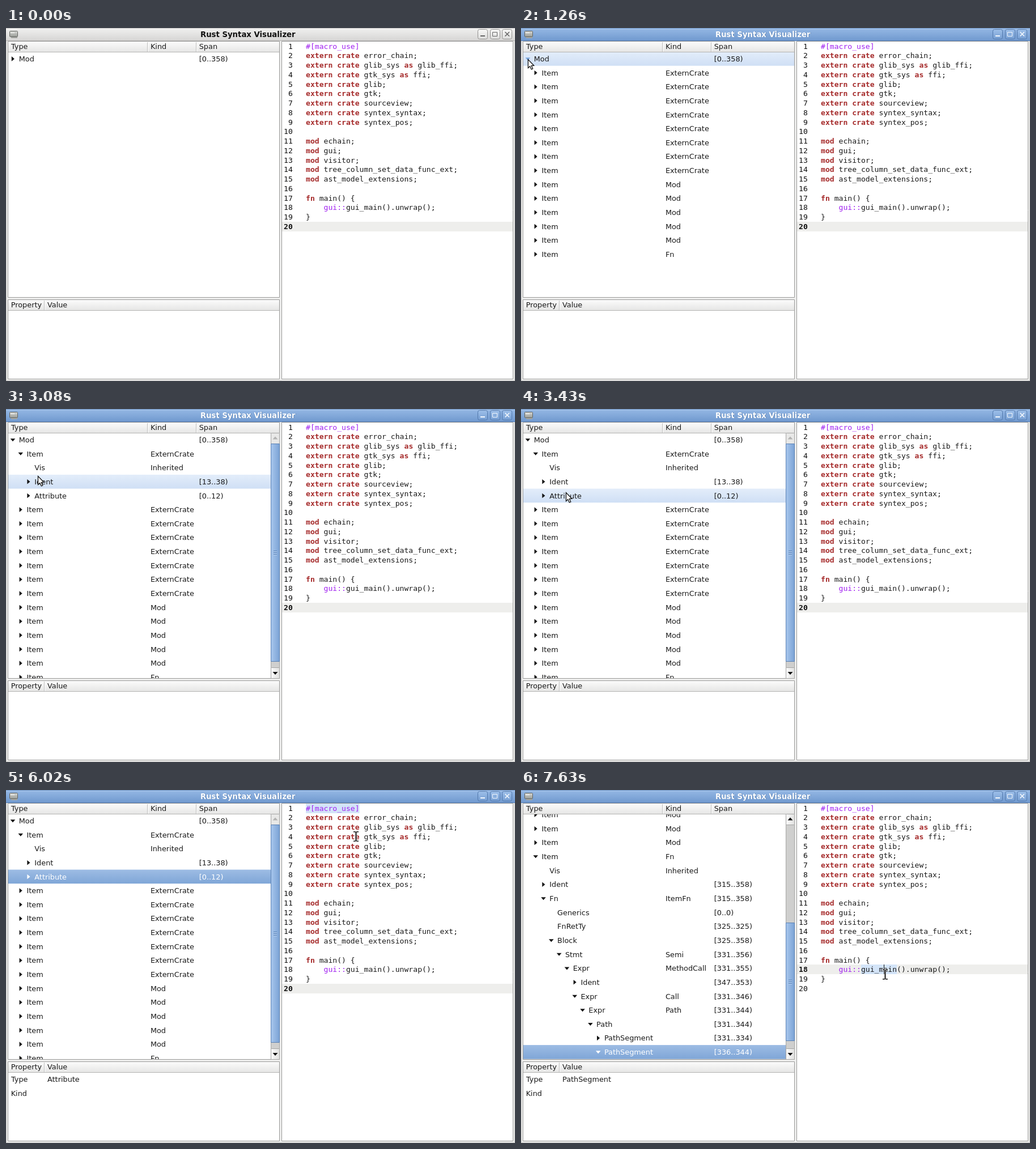
Recreate the animation shown at these times as an HTML page with a canvas. Size 898 by 623 pixels, loop 8 s.

```html
<!DOCTYPE html>
<html lang="en">
<head>
<meta charset="utf-8">
<title>Rust Syntax Visualizer</title>
<style>
  html, body { margin: 0; width: 100%; height: 100%; overflow: hidden; background: #eeeeed; }
  canvas { display: block; }
</style>
</head>
<body>
<canvas id="stage" width="898" height="623"></canvas>
<script>
const ctx = document.getElementById('stage').getContext('2d');
const LOOP = 8000, TICK = 70;
const ROW = 24.64, INDENT = 13.8, TREE_TOP = 42, TREE_BOTTOM = 475;
const KIND_X = 254.9, SPAN_X = 340.7;
const LINE = 16.757, CHAR = 7.886, CODE_X = 529;
const UI = '12.85px "DejaVu Sans", sans-serif';
const TITLE = 'bold 13.25px "DejaVu Sans", sans-serif';
const MONO = '13.1px "DejaVu Sans Mono", monospace';
const INK = '#1a1a1a', KEYWORD = '#a52a2a', MACRO = '#a020f0';

const CODE = `#[macro_use]
extern crate error_chain;
extern crate glib_sys as glib_ffi;
extern crate gtk_sys as ffi;
extern crate glib;
extern crate gtk;
extern crate sourceview;
extern crate syntex_syntax;
extern crate syntex_pos;

mod echain;
mod gui;
mod visitor;
mod tree_column_set_data_func_ext;
mod ast_model_extensions;

fn main() {
    gui::gui_main().unwrap();
}
`.split('\n');

// Row notation: depth, expander (+ closed, - open, . none), type|kind|span
const parseRows = list => list.map(s => {
  const [type, kind = '', span = ''] = s.slice(2).split('|');
  return { depth: +s[0], expander: s[1], type, kind, span };
});
const crates = n => Array(n).fill('1+Item|ExternCrate');
const mods = n => Array(n).fill('1+Item|Mod');
const closedRoot = parseRows(['0+Mod||[0..358)']);
const openRoot = parseRows(['0-Mod||[0..358)', ...crates(8), ...mods(5), '1+Item|Fn']);
const openItem = parseRows(['0-Mod||[0..358)', '1-Item|ExternCrate', '2.Vis|Inherited',
  '2+Ident||[13..38)', '2+Attribute||[0..12)', ...crates(7), ...mods(5), '1+Item|Fn']);
const openFn = parseRows([...mods(3), '1-Item|Fn', '2.Vis|Inherited', '2+Ident||[315..358)',
  '2-Fn|ItemFn|[315..358)', '3.Generics||[0..0)', '3.FnRetTy||[325..325)', '3-Block||[325..358)',
  '4-Stmt|Semi|[331..356)', '5-Expr|MethodCall|[331..355)', '6+Ident||[347..353)',
  '6-Expr|Call|[331..346)', '7-Expr|Path|[331..344)', '8-Path||[331..344)',
  '9+PathSegment||[331..334)', '9-PathSegment||[336..344)']);

// mark: line, first column, length of the highlighted source span
const STATES = [
  { at: 0, rows: closedRoot, line: 20 },
  { at: 1260, rows: openRoot, line: 20, active: true },
  { at: 2450, rows: openItem, line: 20, active: true, thumb: [61, 446] },
  { at: 4060, rows: openItem, line: 20, active: true, thumb: [61, 446], selected: 4, mark: [1, 0, 12] },
  { at: 7630, rows: openFn, top: 31.2, line: 18, active: true, thumb: [234, 443], selected: 17,
    mark: [18, 9, 8], caret: 641 }
];

// Pointer stops: time, x, y, eased arrival
const PATH = [
  [350, -14, 64], [980, 12, 55, true], [1750, 12, 55], [2170, 25, 81, true], [2660, 25, 81],
  [3430, 79, 147, true], [4900, 79, 147], [4970, 80, 148], [5740, 568.5, 38.5, true],
  [6020, 617, 82], [6580, 642, 290], [6790, 642, 324.5], [6930, 642, 324.5], [7070, 642, 325.5]
];

function pointerAt(t) {
  const next = PATH.findIndex(p => p[0] > t);
  if (next === 0) return { x: -50, y: 64 };
  if (next < 0) return { x: PATH.at(-1)[1], y: PATH.at(-1)[2] };
  const [t0, x0, y0] = PATH[next - 1], [t1, x1, y1, eased] = PATH[next];
  let k = (t - t0) / (t1 - t0);
  if (eased) k = k * k * (3 - 2 * k);
  return { x: Math.round(x0 + (x1 - x0) * k), y: Math.round(y0 + (y1 - y0) * k) };
}

function rect(x, y, w, h, fill) {
  ctx.fillStyle = fill;
  ctx.fillRect(x, y, w, h);
}

function shade(x, y, w, h, from, to, sideways) {
  const g = sideways ? ctx.createLinearGradient(x, 0, x + w, 0) : ctx.createLinearGradient(0, y, 0, y + h);
  g.addColorStop(0, from);
  g.addColorStop(1, to);
  rect(x, y, w, h, g);
}

function outline(x, y, w, h, color, radius = 0) {
  ctx.strokeStyle = color;
  ctx.lineWidth = 1;
  ctx.beginPath();
  ctx.roundRect(x + .5, y + .5, w - 1, h - 1, radius);
  ctx.stroke();
}

function text(str, x, y, font = UI, color = INK) {
  ctx.font = font;
  ctx.fillStyle = color;
  ctx.fillText(str, x, y);
}

function polygon(points, fill, stroke) {
  ctx.beginPath();
  points.forEach(([x, y]) => ctx.lineTo(x, y));
  ctx.closePath();
  ctx.fillStyle = fill;
  ctx.fill();
  if (stroke) {
    ctx.strokeStyle = stroke;
    ctx.lineWidth = 1.3;
    ctx.stroke();
  }
}

function panel(x, y, w, h) {
  rect(x, y, w, h, '#fff');
  outline(x, y, w, h, '#9b9b9a');
}

function header(y, separators, labels) {
  shade(4, y, 478, 18, '#fbfbfb', '#e6e6e5');
  rect(4, y + 18, 478, 1, '#b4b4b3');
  for (const x of separators) {
    rect(x, y + 1, 1, 17, '#bcbcbb');
    rect(x + 1, y + 1, 1, 17, '#fff');
  }
  for (const [label, x] of labels) text(label, x, y + 13.4);
}

function titleBar(active) {
  if (active) shade(0, 0, 898, 23, '#96b9e5', '#6f98ce');
  else shade(0, 0, 898, 23, '#f1f1f0', '#d5d4d3');
  rect(0, 0, 898, 1, active ? '#5f88bd' : '#bdbcbb');
  rect(0, 1, 898, 1, active ? '#b2cdef' : '#fafafa');
  rect(0, 22, 898, 1, active ? '#557eb5' : '#b3b2b1');

  shade(7, 6, 13, 9, '#d5d6d3', '#9b9e99');
  outline(6, 5, 15, 11, '#62645f', 1);
  rect(9, 16, 11, 2, '#aaaba7');
  rect(8, 8, 7, 1, '#f4f4f2');

  ctx.textAlign = 'center';
  if (active) text('Rust Syntax Visualizer', 427.5, 16.2, TITLE, '#4b70a3');
  text('Rust Syntax Visualizer', 426.8, 15.5, TITLE, active ? '#fff' : '#111');
  ctx.textAlign = 'left';

  const glyph = active ? '#f4f8fd' : '#666';
  for (const x of [832, 854, 875]) {
    shade(x + 1, 3, 16, 16, active ? '#9dbfe9' : '#f8f8f7', active ? '#779fd3' : '#dddddc');
    outline(x, 2, 18, 18, active ? '#5077ab' : '#92918f', 3);
  }
  rect(837, 13, 8, 2, glyph);
  outline(858, 7, 9, 8, glyph);
  ctx.strokeStyle = glyph;
  ctx.lineWidth = 1.6;
  ctx.beginPath();
  ctx.moveTo(880.5, 7); ctx.lineTo(888, 14.5);
  ctx.moveTo(888, 7); ctx.lineTo(880.5, 14.5);
  ctx.stroke();
}

function expander(open, x, y, color) {
  polygon(open
    ? [[x - 4.3, y - 2.2], [x + 4.3, y - 2.2], [x, y + 2.8]]
    : [[x - 2.2, y - 4.3], [x + 2.9, y], [x - 2.2, y + 4.3]], color);
}

function tree(state, pointer) {
  const right = state.thumb ? 467 : 482, top = state.top ?? TREE_TOP;
  const inside = pointer.x >= 4 && pointer.x < right && pointer.y >= TREE_TOP && pointer.y < TREE_BOTTOM;
  const hovered = inside ? Math.floor((pointer.y - top) / ROW) : -1;

  panel(3, 23, 480, 453);
  ctx.save();
  ctx.beginPath();
  ctx.rect(4, TREE_TOP, right - 4, TREE_BOTTOM - TREE_TOP);
  ctx.clip();
  state.rows.forEach((row, i) => {
    const y = top + i * ROW, selected = i === state.selected;
    const color = selected ? '#fff' : INK;
    if (selected) shade(4, y, right - 4, ROW, '#9dbce4', '#7fa6d7');
    else if (i === hovered) shade(4, y, right - 4, ROW, '#e3edfa', '#cfdff5');
    const x = 12 + row.depth * INDENT;
    if (row.expander !== '.') {
      const lit = i === hovered && !selected && Math.abs(pointer.x - x) < 7;
      expander(row.expander === '-', x, y + 12.4, selected ? '#fff' : lit ? '#7ba7de' : '#111');
    }
    text(row.type, x + 10.7, y + 17, UI, color);
    text(row.kind, KIND_X, y + 17, UI, color);
    text(row.span, SPAN_X, y + 17, UI, color);
  });
  ctx.restore();
  header(24, [249, 335], [['Type', 9], ['Kind', KIND_X], ['Span', SPAN_X]]);
  if (state.thumb) scrollbar(state.thumb, pointer);
}

function scrollbar([from, to], pointer) {
  const lit = pointer.x >= 467 && pointer.x < 483 && pointer.y >= from && pointer.y < to;
  const atTop = from === 61, middle = Math.round((from + to) / 2);
  rect(467, 42, 16, 433, '#cfcfce');
  outline(467, 42, 16, 434, '#a5a5a4');
  for (const y of [42, 456]) {
    if (y === 42 && atTop) rect(468, y, 14, 19, '#e8e8e7');
    else shade(468, y, 14, 19, '#fafafa', '#e2e2e1', true);
    outline(467, y, 16, 20, '#a5a5a4', 1);
  }
  polygon([[470.5, 53.5], [479.5, 53.5], [475, 48.5]], atTop ? '#b3b3b2' : '#111');
  polygon([[470.5, 464], [479.5, 464], [475, 469]], '#111');
  shade(468, from, 14, to - from, lit ? '#b9d3f3' : '#a6c5ec', lit ? '#8eb3e2' : '#7da4d6', true);
  outline(467, from, 16, to - from, '#5b82b5');
  for (const dy of [-4, -1, 2]) {
    rect(472, middle + dy, 6, 1, '#557eb4');
    rect(472, middle + dy + 1, 6, 1, '#bad3f1');
  }
}

function properties(state) {
  panel(3, 479, 480, 141);
  header(480, [67], [['Property', 8.7], ['Value', 73]]);
  if (state.selected === undefined) return;
  text('Type', 9, 515.3);
  text(state.rows[state.selected].type, 73, 515.3);
  text('Kind', 8.7, 540);
}

function codeView(state) {
  const lineTop = n => 23.6 + (n - 1) * LINE;
  panel(486, 23, 409, 597);
  rect(487, Math.round(lineTop(state.line)), 407, 17, '#eeeeec');
  if (state.mark) {
    const [line, column, length] = state.mark;
    rect(CODE_X + column * CHAR, Math.round(lineTop(line)), length * CHAR, 17, '#d3e4f8');
  }
  CODE.forEach((source, i) => {
    const n = i + 1, y = lineTop(n) + 13;
    text(String(n).padStart(2), 490, y, n === state.line ? 'bold ' + MONO : MONO, '#111');
    for (const m of source.matchAll(/#\[\w+\]|\b\w+::|\b(?:extern|crate|as|mod|fn)\b|\w+|[^\w\s]+/g)) {
      const keyword = /^(extern|crate|as|mod|fn)$/.test(m[0]);
      const macro = /^#|::$/.test(m[0]);
      text(m[0], CODE_X + m.index * CHAR, y, keyword ? 'bold ' + MONO : MONO,
        keyword ? KEYWORD : macro ? MACRO : INK);
    }
  });
  if (state.caret) rect(state.caret - 1, Math.round(lineTop(state.line)), 1, 17, '#111');
}

function drawPointer({ x, y }) {
  ctx.save();
  ctx.translate(x, y);
  if (x > 487) {
    const beam = [[-4, -9, 4, 1.5], [1, -9, 4, 1.5], [-.5, -8, 2, 16], [-4, 7.5, 4, 1.5], [1, 7.5, 4, 1.5]];
    for (const [bx, by, w, h] of beam) rect(bx - .8, by - .8, w + 1.6, h + 1.6, 'rgba(255,255,255,.8)');
    for (const [bx, by, w, h] of beam) rect(bx, by, w, h, '#111');
  } else {
    polygon([[.5, .5], [.5, 15.5], [3.8, 12.5], [6.3, 18], [8.8, 17], [6.4, 11.5], [10.8, 11.2]], '#fff', '#111');
  }
  ctx.restore();
}

function draw(now) {
  const t = Math.floor((now % LOOP) / TICK) * TICK;
  const state = STATES.findLast(s => s.at <= t);
  const pointer = pointerAt(t);
  rect(0, 0, 898, 623, '#eeeeed');
  rect(0, 23, 1, 600, '#c4c4c3');
  rect(897, 23, 1, 600, '#c4c4c3');
  rect(0, 622, 898, 1, '#c4c4c3');
  titleBar(state.active);
  tree(state, pointer);
  properties(state);
  codeView(state);
  drawPointer(pointer);
}

const start = performance.now();
function frame() {
  draw(performance.now() - start);
  requestAnimationFrame(frame);
}
frame();
</script>
</body>
</html>
```
